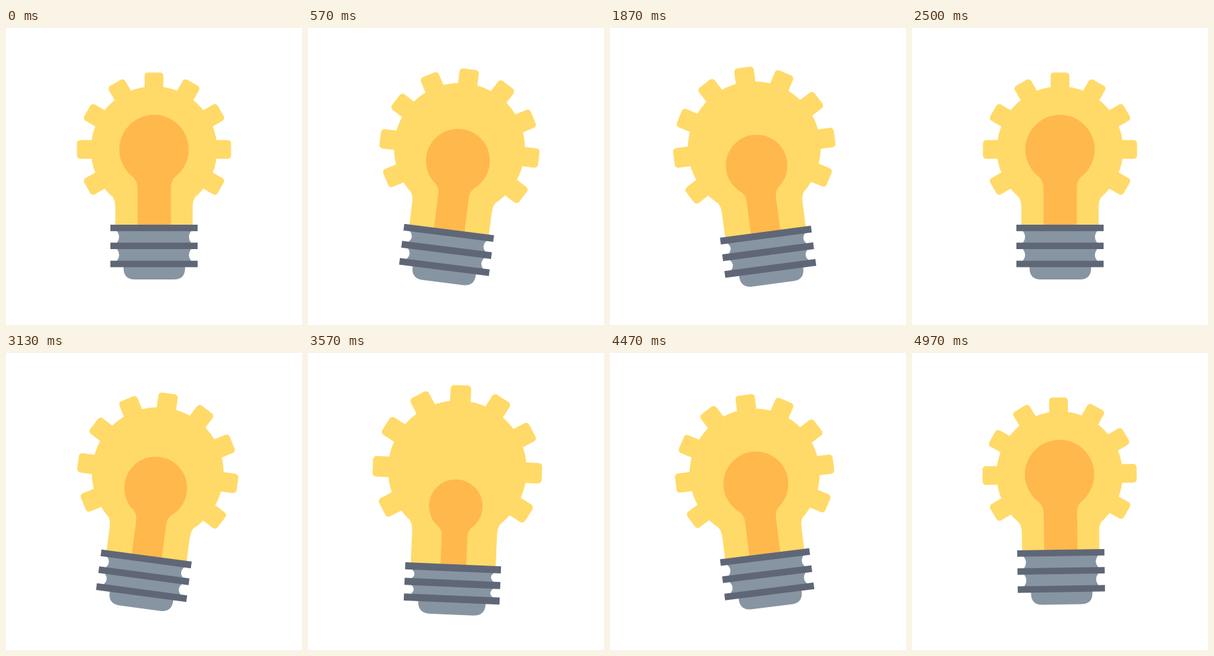
These frames come from a looping animation (448 px wide and 450 px high, 5.01 s). An HTML page:

```html
<!DOCTYPE html>
<html lang="en">
<head>
<meta charset="utf-8">
<title>Gear bulb</title>
<style>
html, body { margin: 0; width: 100%; height: 100%; overflow: hidden; background: #fff; }
svg { display: block; width: 448px; height: 450px; }
</style>
</head>
<body>
<svg viewBox="0 0 448 450">
  <g id="bulb">
    <g id="gear" fill="#ffda68">
      <circle cx="224" cy="184" r="95.5"/>
      <path d="M149 243C159 250 165.5 259 165.5 270H282.5C282.5 259 289 250 299 243Z"/>
    </g>
    <rect id="neck" x="165.5" y="245" width="117" height="57" fill="#ffda68"/>
    <g id="core" fill="#ffb84c">
      <circle cx="224" cy="184" r="52.5"/>
      <path d="M184 218C193 226 199 231 199 242V302H249.5V242C249.5 231 255 226 264 218Z"/>
    </g>
    <path d="M178 357V364Q178 381 195 381H254Q271 381 271 364V357Z" fill="#8795a2"/>
    <g id="gaps" fill="#8795a2"></g>
    <g id="bars" fill="#5f6777"></g>
  </g>
</svg>
<script>
const $ = id => document.getElementById(id);
const LOOP = 5010, STEP = 33.4, CYCLE = 75;
const BAR_H = 9.8, BAR_Y = [298, 325.2, 352.6], BAR_DROP = [13.7, 8, 2];
const SWING = [[0, 0], [18.75, 8], [38, 0], [57, -8], [75, 0]];

function add(parent, tag, attrs) {
  const el = document.createElementNS('http://www.w3.org/2000/svg', tag);
  for (const key in attrs) el.setAttribute(key, attrs[key]);
  return parent.appendChild(el);
}
const place = (el, value) => el.setAttribute('transform', value);

for (let a = -120; a <= 120; a += 30) {
  add($('gear'), 'rect', { x: 209.8, y: 67.4, width: 28.4, height: 32, rx: 5, transform: `rotate(${a} 224 184)` });
}
const bars = BAR_Y.map(() => add($('bars'), 'rect', { x: 158, width: 132, height: BAR_H }));
// Unit-height metal with curved sides, tucked slightly under the bars
const METAL = 'M168 -.1V0Q174.5 .5 168 1V1.1H280V1Q273.5 .5 280 0V-.1Z';
const gaps = [0, 1].map(() => add($('gaps'), 'path', { d: METAL }));

function swing(n) {
  const i = SWING.findIndex(k => n < k[0]);
  const [t0, a0] = SWING[i - 1], [t1, a1] = SWING[i];
  return a0 + (a1 - a0) * (n - t0) / (t1 - t0);
}

const easeInOut = u => u < 0.5 ? 4 * u ** 3 : 1 - 4 * (1 - u) ** 3;
const swell = n => easeInOut(1 - Math.abs(2 * n / CYCLE - 1));

function draw(time) {
  const n = Math.floor((time % LOOP + 5) / STEP) % CYCLE;
  const p = swell(n), y = BAR_Y.map((v, i) => v + BAR_DROP[i] * p);
  const drop = BAR_DROP[0] * p;
  place($('bulb'), `translate(224 224) rotate(${swing(n)}) scale(${1 + 0.1 * p}) translate(-224 -224)`);
  place($('gear'), `translate(0 ${-3 * p * p})`);
  place($('neck'), `translate(0 ${drop})`);
  place($('core'), `translate(224 ${298 + drop}) scale(${1 - 0.3 * p}) translate(-224 -298)`);
  bars.forEach((bar, i) => bar.setAttribute('y', y[i]));
  gaps.forEach((gap, i) => {
    const top = y[i] + BAR_H;
    place(gap, `translate(0 ${top}) scale(1 ${y[i + 1] - top})`);
  });
}

const start = performance.now();
function tick() {
  draw(performance.now() - start);
  requestAnimationFrame(tick);
}
tick();
</script>
</body>
</html>
```
